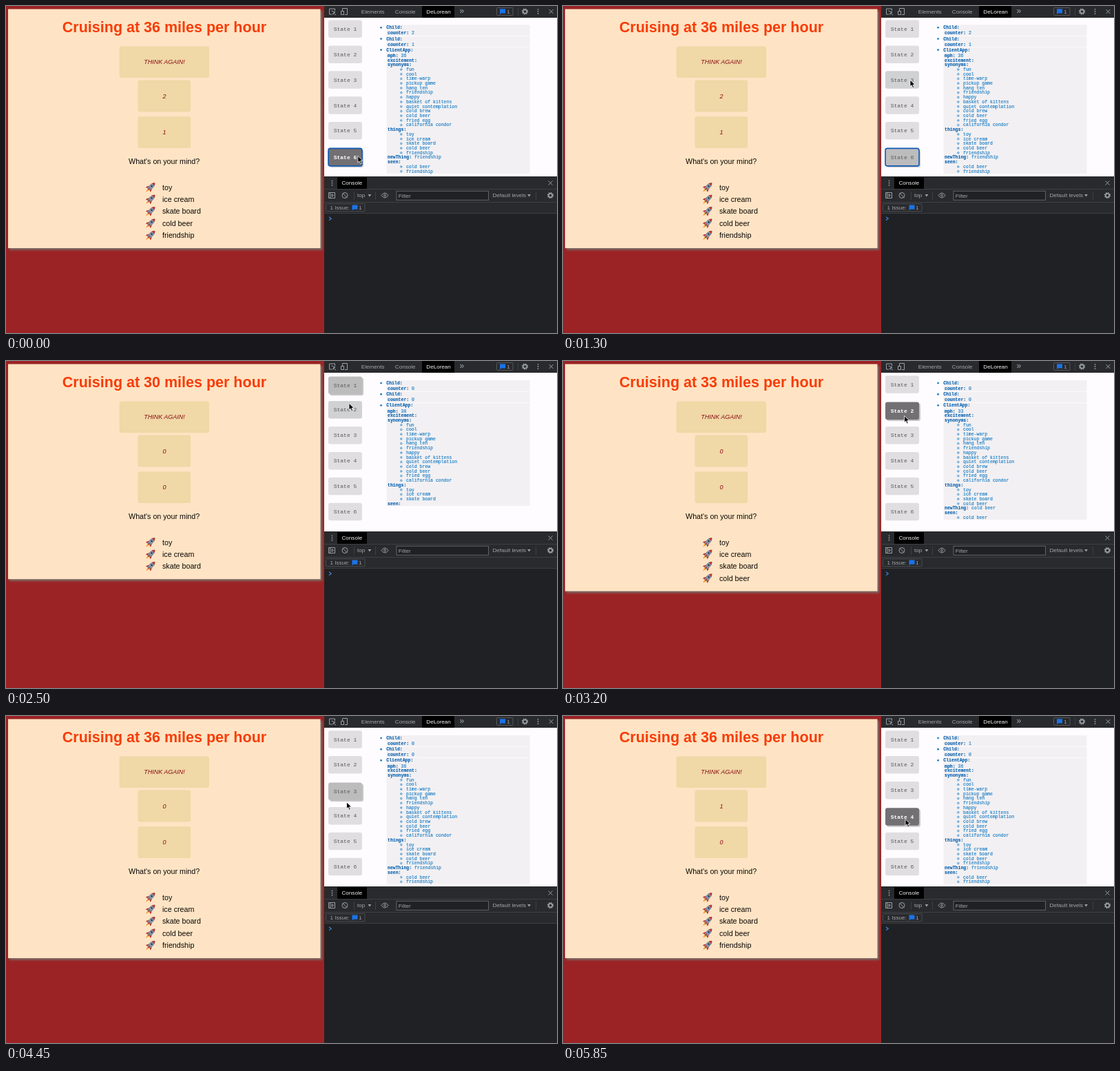
These frames come from a looping animation (800x474 px, 5.9 s). An HTML page:

```html
<!DOCTYPE html>
<html lang="en">
<head>
<meta charset="utf-8">
<title>State time travel</title>
<style>
  html, body { margin: 0; width: 100%; height: 100%; overflow: hidden; background: #9b2325; }
  svg { display: block; font-family: "Liberation Sans", Arial, sans-serif; }
  .mid { text-anchor: middle; }
  .page { font-size: 10.7px; fill: #0b0705; }
  .title { font-size: 21.5px; font-weight: bold; fill: #f83c08; }
  .choice { font-size: 9px; font-style: italic; fill: #8b0d12; }
  .tools { font-size: 8.1px; fill: #a2a6ab; }
  .tools .on { fill: #f4f4f4; }
  .icon { fill: none; stroke: #9aa0a6; stroke-width: 1; }
  .mono { font-family: "Liberation Mono", "Courier New", monospace; }
  .tree { font-size: 6.5px; fill: #0f78c4; stroke: #0f78c4; stroke-width: .12; }
  .tree .key { font-weight: bold; fill: #0058ab; }
  .button { font-size: 8px; fill: #5a585a; }
  .dark { font-weight: bold; fill: #fff; }
</style>
</head>
<body>
<svg width="800" height="474" viewBox="0 0 800 474">
  <defs>
    <filter id="soft" x="-10%" y="-10%" width="120%" height="120%"><feGaussianBlur stdDeviation="1.6"/></filter>
    <filter id="faint" x="-10%" y="-20%" width="120%" height="140%"><feGaussianBlur stdDeviation=".7"/></filter>
    <clipPath id="view"><rect x="462" y="17" width="338" height="230"/></clipPath>
    <g id="rocket" transform="rotate(45)">
      <path d="M-1.8 4L0 9.6L1.8 4Z" fill="#f58a1c"/>
      <path d="M-.8 4L0 7.4L.8 4Z" fill="#ffd84a"/>
      <path d="M-2.4 0L-4.6 3.2V5.6L-2 3.6ZM2.4 0L4.6 3.2V5.6L2 3.6Z" fill="#c9302c"/>
      <path d="M0-8.6C3-5.6 3.5-1 2 4.2H-2C-3.5-1-3-5.6 0-8.6Z" fill="#8a9bb0" stroke="#4b5a70" stroke-width=".6"/>
      <path d="M0-8.6C1.3-7.3 2-6.2 2.4-5H-2.4C-2-6.2-1.3-7.3 0-8.6Z" fill="#c9302c"/>
      <circle cy="-2.2" r="1.3" fill="#20344f"/>
      <path d="M-.6 1H.6V5H-.6Z" fill="#b52a28"/>
    </g>
    <path id="cross" d="M-3-3L3 3M-3 3L3-3"/>
    <g id="gear"><circle r="2.7" stroke-width="1.7"/><circle r="4" stroke-width="1.3" stroke-dasharray="1.6 1.54"/></g>
    <g id="dots" fill="#9aa0a6" stroke="none"><circle cy="-3.2" r=".9"/><circle r=".9"/><circle cy="3.2" r=".9"/></g>
    <path id="chat" d="M-4-3.8H4V2.4H-2L-4 4.2Z" fill="#1a73e8" stroke="none"/>
    <path id="drop" d="M-2.4-1.5H2.4L0 1.9Z" fill="#9aa0a6"/>
  </defs>

  <rect width="800" height="474" fill="#9b2325"/>
  <rect id="shade" x="5" y="7" width="454" fill="#77706a" filter="url(#soft)"/>
  <rect id="card" x="3" y="4.5" width="453.5" fill="#fee4c4"/>
  <text id="title" class="title mid" x="230" y="38"></text>
  <g fill="#f0d8a7">
    <rect x="164.7" y="58.4" width="130.4" height="45.6" rx="3"/>
    <rect x="191.4" y="107.4" width="76.7" height="46" rx="3"/>
    <rect x="191.4" y="160.3" width="76.7" height="45.6" rx="3"/>
  </g>
  <g class="choice mid">
    <text x="230" y="84.3">THINK AGAIN!</text>
    <text id="first" x="230" y="133.5"></text>
    <text id="second" x="230" y="185.8"></text>
  </g>
  <g class="page">
    <text class="mid" x="229.6" y="228.8">What's on your mind?</text>
    <g id="things"></g>
  </g>

  <rect x="462" width="338" height="474" fill="#202124"/>
  <rect x="462" y="17" width="338" height="230" fill="#fffcff"/>
  <g clip-path="url(#view)">
    <g id="panel">
      <g id="tree" class="mono tree"></g>
      <g id="buttons" class="mono button mid"></g>
    </g>
  </g>

  <g fill="#292a2d">
    <rect x="462" width="338" height="17"/>
    <rect x="462" y="247" width="338" height="53"/>
  </g>
  <g fill="#000"><rect x="604" width="47" height="17"/><rect x="481" y="248" width="43" height="17"/></g>
  <path d="M462 265.5H800M462 284.5H800M462 300.5H800M505.5 269V281M536.5 269V281M743.5 3V14M769.5 269V281" stroke="#43464a" stroke-width=".8"/>
  <g class="tools">
    <text x="515.8" y="10.8">Elements</text>
    <text x="564.8" y="10.8">Console</text>
    <text class="on" x="610.3" y="10.8">DeLorean</text>
    <text x="658.5" y="11.2" font-size="12">»</text>
    <text x="727.3" y="10.8">1</text>
    <text class="on" x="487.5" y="259.2">Console</text>
    <text x="510" y="277.4">top</text>
    <text x="569.8" y="277.6">Filter</text>
    <text x="706.5" y="277.4">Default levels</text>
    <text x="470.5" y="294.9">1 Issue:</text>
    <text x="512" y="294.9">1</text>
  </g>
  <use href="#drop" x="528" y="274.5"/>
  <use href="#drop" x="759.5" y="274.5"/>
  <g class="icon">
    <path d="M473 12H469.5V4H477.5V7M472.5 7L478 9L475.6 10L479 13.2M475.6 10L474.6 12.4Z"/>
    <path d="M488.5 8V3.5H495.5V12.5H492M486.5 7.5H490.5V12.5H486.5Z"/>
    <rect x="712.5" y="2.5" width="23.5" height="11" rx="1" stroke="#55585c"/>
    <use href="#chat" x="721" y="8"/>
    <use href="#gear" x="753.5" y="8"/>
    <use href="#dots" x="772.5" y="8"/>
    <use href="#cross" x="791.5" y="8"/>
    <use href="#dots" x="473.5" y="256.5"/>
    <use href="#cross" x="790.5" y="256.5"/>
    <path d="M468.5 270.5H477.5V278.5H468.5ZM470.7 270.5V278.5M473 272.6L475.8 274.5L473 276.4Z"/>
    <circle cx="492" cy="274.5" r="4"/><path d="M489.2 271.7L494.8 277.3"/>
    <path d="M545 274.5Q550 267.5 555 274.5Q550 281.5 545 274.5Z"/><circle cx="550" cy="274.5" r="1.4"/>
    <rect x="567" y="268.3" width="133.5" height="13" fill="#202124" stroke="#5f6368"/>
    <use href="#gear" x="790.5" y="274.5"/>
    <rect x="464.5" y="286.7" width="56.5" height="11" rx="1" stroke="#494c50"/>
    <use href="#chat" x="506.5" y="292.3"/>
    <path d="M469 305.8L472.3 308.2L469 310.6" stroke="#3b82d6" stroke-width="1.2"/>
  </g>
  <text class="tools" x="569.8" y="277.6">Filter</text>

  <g id="pointer">
    <circle id="click" cx=".7" cy="1" r="13" fill="none" stroke="#111" stroke-width="2"/>
    <path d="M0 0V9.6L2.2 7.6L3.9 11.4L5.6 10.7L4 7L7 6.8Z" fill="#000" stroke="#fff" stroke-width=".8"/>
  </g>
</svg>

<script>
const LOOP = 5900;
const $ = id => document.getElementById(id);
const clamp = v => Math.max(0, Math.min(1, v));
const ease = v => (1 - Math.cos(Math.PI * clamp(v))) / 2;

const synonyms = ["fun", "cool", "time-warp", "pickup game", "hang ten", "friendship", "happy",
  "basket of kittens", "quiet contemplation", "cold brew", "cold beer", "fried egg", "california condor"];
const things = ["toy", "ice cream", "skate board", "cold beer", "friendship"];

// Each step: button pressed from `down` to `up`, its state appears on release.
const steps = [
  { down: -1000, up: -900, button: 5, mph: 36, count: 5, counters: [2, 1], scroll: .7 },
  { down: 1800, up: 2000, button: 0, mph: 30, count: 3, counters: [0, 0], scroll: 0 },
  { down: 2700, up: 2900, button: 1, mph: 33, count: 4, counters: [0, 0], scroll: 0 },
  { down: 3700, up: 3900, button: 2, mph: 36, count: 5, counters: [0, 0], scroll: 0 },
  { down: 4850, up: 5050, button: 3, mph: 36, count: 5, counters: [1, 0], scroll: 0 }
];

// Pointer stops: time, x, y.
const path = [
  [0, 510.8, 217.3], [550, 510.8, 217.3], [750, 510.3, 213.3], [850, 510.3, 213.3],
  [1650, 499.8, 36.3], [2050, 499.8, 36.3], [2500, 498, 61.3], [2650, 496.5, 70],
  [3050, 496.5, 70], [3500, 492.8, 107.3], [4250, 492.8, 107.3], [4700, 497, 149.5], [LOOP, 497, 149.5]
];

function pointerAt(t) {
  const i = path.findIndex(p => p[0] > t);
  const [a, b] = [path[i - 1], path[i]];
  const k = ease((t - a[0]) / (b[0] - a[0]));
  return [a[1] + (b[1] - a[1]) * k, a[2] + (b[2] - a[2]) * k];
}

function drawTree({ mph, count, counters }) {
  let out = "", y = 32.2;
  const row = (x, key, value = "") =>
    out += `<text x="${x}" y="${y + 1.9}"><tspan class="key">${key}</tspan> ${value}</text>`;
  const head = name => {
    out += `<circle cx="544.6" cy="${y - .2}" r="1.3"/>`;
    row(552.3, name);
    y += 8.08;
  };
  const field = (key, value) => { row(554, key, value); y += 6.71; };
  const list = (key, items) => {
    field(key);
    for (const item of items) {
      out += `<circle cx="573.8" cy="${y}" r="1.2" fill="none" style="stroke-width:.8"/>` +
        `<text x="581" y="${y + 1.9}">${item}</text>`;
      y += 6.71;
    }
  };

  for (const n of counters) {
    head("Child:");
    field("counter:", n);
    y += 1.37;
  }
  head("ClientApp:");
  field("mph:", mph);
  field("excitement:");
  list("synonyms:", synonyms);
  list("things:", things.slice(0, count));
  if (count > 3) field("newThing:", things[count - 1]);
  list("seen:", things.slice(3, count));

  const band = (top, bottom) =>
    `<rect x="552.5" y="${top}" width="208" height="${bottom - top}" fill="#f2f0f2" stroke="none"/>`;
  $("tree").innerHTML = band(28, 43.9) + band(44.7, 60.2) + band(61, y - 3.5) + out;
}

function drawState(s) {
  const height = 311.7 + (s.count - 3) * 17.4;
  $("card").setAttribute("height", height);
  $("shade").setAttribute("height", height);
  $("title").textContent = `Cruising at ${s.mph} miles per hour`;
  $("first").textContent = s.counters[0];
  $("second").textContent = s.counters[1];
  $("things").innerHTML = things.slice(0, s.count).map((name, i) => {
    const y = 262.6 + i * 17.4;
    return `<use href="#rocket" x="0" y="0" transform="translate(210 ${y})"/><text x="227" y="${y + 3.9}">${name}</text>`;
  }).join("");
  $("panel").setAttribute("transform", `translate(0 ${-s.scroll})`);
  drawTree(s);
}

const buttons = Array.from({ length: 6 }, (_, i) => {
  const g = document.createElementNS("http://www.w3.org/2000/svg", "g");
  g.innerHTML = `<rect x="470" y="2" width="49" height="25.5" rx="3" fill="#aaa" filter="url(#faint)"/>
    <rect x="468" width="49" height="25.5" rx="3"/>
    <text x="492.5" y="15.4">State ${i + 1}</text>`;
  $("buttons").append(g);
  const [shadow, face, label] = g.children;
  return { g, shadow, face, label, top: 21.2 + i * 36.9 };
});

function drawButton(b, i, t, now, prev, pressed, [x, y]) {
  const active = i === now.button;
  let sunk = 0;
  if (active) sunk = ease((t - now.up - 100) / 150);
  else if (prev && i === prev.button) sunk = 1 - ease((t - now.up) / 150);
  const hover = x > 468 && x < 517 && y > b.top - .7 && y < b.top + 26;
  const dark = i === pressed || (active && hover);
  const ring = i === 5 && t < steps[1].down;
  b.g.setAttribute("transform", `translate(0 ${b.top + 1.4 * sunk})`);
  b.shadow.setAttribute("opacity", sunk * .65);
  b.face.setAttribute("fill", dark ? "#737073" : active ? "#bdbcbd" : hover ? "#d0d1d3" : "#e0dee0");
  b.face.setAttribute("stroke", ring ? "#1059b5" : "none");
  b.face.setAttribute("stroke-width", 1.6);
  b.label.setAttribute("class", dark ? "dark" : "");
}

let shown;
const start = performance.now();

function frame() {
  const t = (performance.now() - start) % LOOP;
  const index = steps.findLastIndex(s => s.up <= t);
  const now = steps[index];
  if (now !== shown) drawState(shown = now);

  const press = steps.find(s => s.down <= t && t < s.up);
  const spot = pointerAt(t);
  buttons.forEach((b, i) => drawButton(b, i, t, now, steps[index - 1], press && press.button, spot));
  $("pointer").setAttribute("transform", `translate(${spot})`);
  $("click").setAttribute("visibility", press ? "visible" : "hidden");
  requestAnimationFrame(frame);
}
frame();
</script>
</body>
</html>
```
